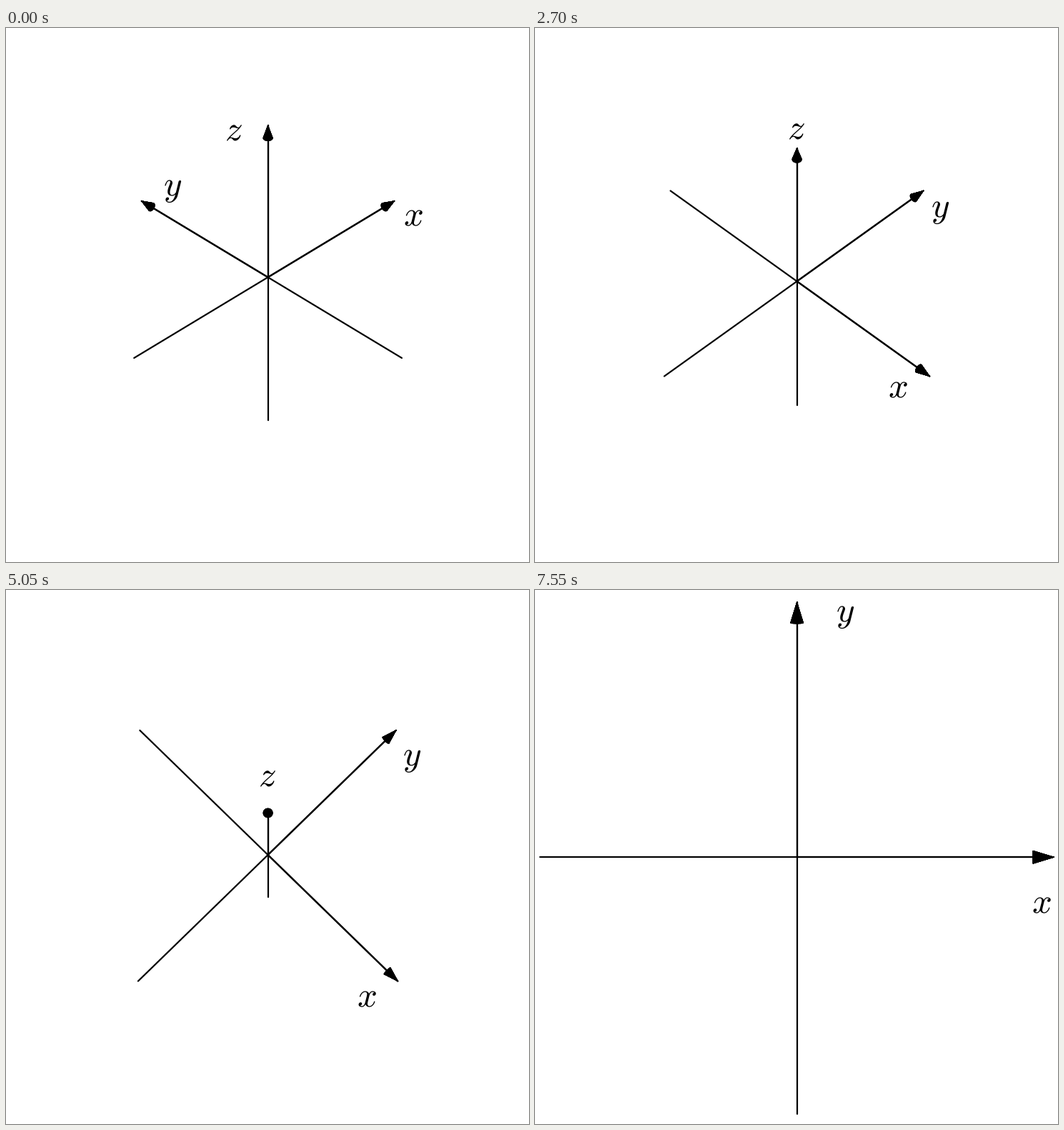
These frames come from a looping animation (732x746 px, 8 s). A matplotlib script:

```python
import itertools

import matplotlib.pyplot as plt
import numpy as np
from matplotlib.animation import FuncAnimation
from matplotlib.collections import PolyCollection

plt.rcParams["text.hinting"] = "no_hinting"

W, H, DPI = 732, 746, 64
PT = 72 / DPI                      # points per pixel
FRAMES, INTERVAL = 160, 50
SPIN_END, RISE_START, RISE_END, LAST = 40, 41, 111, 151

# camera stations (only their directions matter) and distances in half axes
LOW = np.array([13.34, -13.34, 14.22])
HIGH = np.array([2.77, -2.77, 26.1])
TOP = np.array([0, -2.77, 26.1])
NEAR, FAR = 19.5, 26

CENTER = np.array([366.6, 359.7])
FIT = np.array([751, 902])         # room for the projected bounding cube
CUBE = np.array(list(itertools.product((-1, 1), repeat=3)))
HEAD_LENGTH, HEAD_RADIUS = 0.081, 0.025
EM = 49

# name: (label position, drop from ink centre to baseline)
LABELS = {
    "x": ((0.955, -0.19, 0), 0.215 * EM),
    "y": ((0.19, 0.94, 0), 0.118 * EM),
    "z": ((-0.126, 0.126, 0.952), 0.215 * EM),
}


def camera(k):
    """Return the direction towards the eye and its distance."""
    if k <= SPIN_END:
        phi = np.radians(45 - 90 * k / SPIN_END)
        radius = np.hypot(LOW[0], LOW[1])
        eye = np.array([-radius * np.sin(phi), -radius * np.cos(phi), LOW[2]])
    elif k <= RISE_END:
        eye = LOW + (HIGH - LOW) * (k - RISE_START) / (RISE_END - RISE_START)
    else:
        eye = HIGH + (TOP - HIGH) * (k - RISE_END) / (LAST - RISE_END)
    distance = np.interp(k, [RISE_START, RISE_END], [NEAR, FAR])
    return eye / np.linalg.norm(eye), distance


def projector(direction, distance):
    """Return a function from space to pixels, fitted to the cube."""
    forward = -direction
    right = np.cross(forward, (0, 0, 1))
    right /= np.linalg.norm(right)
    up = np.cross(right, forward)

    def flat(points):
        points = np.asarray(points, float)
        shrink = 1 + points @ forward / distance
        return np.stack([points @ right, -(points @ up)], -1) / shrink[..., None]

    corners = flat(CUBE)
    low, high = corners.min(0), corners.max(0)
    scale = (FIT / (high - low)).min()
    return lambda points: CENTER + (flat(points) - (low + high) / 2) * scale


def cone(i):
    """Base ring of the arrowhead on axis i."""
    turn = np.linspace(0, 2 * np.pi, 33)
    ring = np.zeros((len(turn), 3))
    ring[:, i] = 1 - HEAD_LENGTH
    ring[:, (i + 1) % 3] = HEAD_RADIUS * np.cos(turn)
    ring[:, (i + 2) % 3] = HEAD_RADIUS * np.sin(turn)
    return ring


fig = plt.figure(figsize=(W / DPI, H / DPI), dpi=DPI, facecolor="white")
ax = fig.add_axes([0, 0, 1, 1])
ax.set_xlim(0, W)
ax.set_ylim(H, 0)
ax.axis("off")


class Axis:
    def __init__(self, i, name):
        self.tip = np.eye(3)[i]
        self.ring = cone(i)
        self.anchor, self.drop = LABELS[name]
        style = dict(color="black", lw=2.2 * PT, solid_capstyle="round")
        self.whole, = ax.plot([], [], **style)
        self.half, = ax.plot([], [], **style)
        self.head = PolyCollection([], facecolor="black", edgecolor="black",
                                   linewidth=0.8 * PT)
        ax.add_collection(self.head, autolim=False)
        self.text = ax.text(0, 0, f"${name}$", fontsize=EM * PT, color="black",
                            math_fontfamily="cm", ha="center", va="baseline")
        self.artists = [self.whole, self.half, self.head, self.text]

    def draw(self, project):
        tail, origin, tip = project([-self.tip, 0 * self.tip, self.tip])
        self.whole.set_data(*np.array([tail, tip]).T)
        self.half.set_data(*np.array([origin, tip]).T)
        ring = project(self.ring)
        sides = [np.array([tip, a, b]) for a, b in zip(ring, ring[1:])]
        self.head.set_verts(sides + [ring])
        x, y = project(self.anchor)
        self.text.set_position((x - 1, y + self.drop))

    def show(self, visible):
        for artist in self.artists:
            artist.set_visible(visible)


axes = [Axis(i, name) for i, name in enumerate("xyz")]


def update(frame):
    k = min(frame, LAST)
    project = projector(*camera(k))
    for axis in axes:
        axis.draw(project)
    axes[2].show(k < LAST)
    return [artist for axis in axes for artist in axis.artists]


anim = FuncAnimation(fig, update, frames=FRAMES, interval=INTERVAL,
                     repeat=True, repeat_delay=0, blit=False)
plt.show()
```
